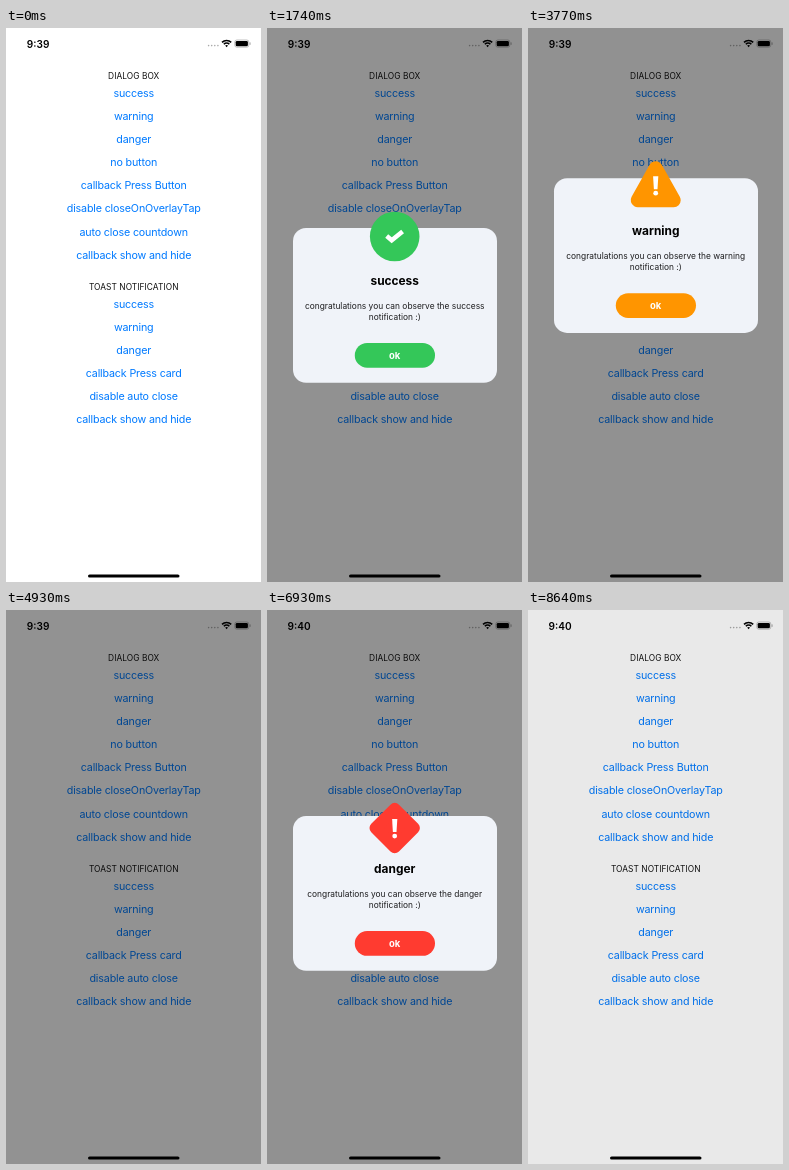
Write an HTML page with a canvas that moves like this. It is 255 px wide and 554 px high and loops after 8690 ms.

```html
<!DOCTYPE html>
<html lang="en">
<head>
<meta charset="utf-8">
<title>Dialog demo</title>
<style>
  html, body { margin: 0; width: 100%; height: 100%; overflow: hidden; background: #fff; }
  canvas { display: block; width: 255px; height: 554px; }
</style>
</head>
<body>
<canvas id="stage"></canvas>
<script>
const W = 255, H = 554, MID = 127.7, LOOP = 8690;
const FADE = 250;          // overlay fade and card exit, ms
const REST = 200, OUT = 571; // card top when settled and when off stage
const DIM = 0.43;
const FONT = 'Inter, Roboto, sans-serif';

const canvas = document.getElementById('stage');
const ctx = canvas.getContext('2d');
const scale = Math.max(1, window.devicePixelRatio || 1);
canvas.width = W * scale;
canvas.height = H * scale;

const sections = [
  { title: 'DIALOG BOX', y: 50.6, items: ['success', 'warning', 'danger', 'no button',
    'callback Press Button', 'disable closeOnOverlayTap', 'auto close countdown', 'callback show and hide'] },
  { title: 'TOAST NOTIFICATION', y: 261.6, items: ['success', 'warning', 'danger',
    'callback Press card', 'disable auto close', 'callback show and hide'] }
];

const dialogs = [
  { name: 'success', color: '#34c759', press: 100, open: 280, close: 2143, badge: checkBadge },
  { name: 'warning', color: '#ff9500', press: 3160, open: 3330, close: 4668, badge: triangleBadge },
  { name: 'danger', color: '#ff3b30', press: 6100, open: 6235, close: 8213, badge: diamondBadge }
];

const clamp = v => Math.min(1, Math.max(0, v));

// cubic-bezier(.42, 0, 1, 1), solved by bisection
function easeIn(x) {
  let lo = 0, hi = 1;
  for (let i = 0; i < 20; i++) {
    const u = (lo + hi) / 2, v = 1 - u;
    if (1.26 * v * v * u + 3 * v * u * u + u * u * u < x) lo = u; else hi = u;
  }
  return 3 * (1 - lo) * lo * lo + lo * lo * lo;
}

function easeInOut(x) {
  x = clamp(x);
  return x < 0.5 ? easeIn(2 * x) / 2 : 1 - easeIn(2 - 2 * x) / 2;
}

// Remaining distance (1 to 0) of an underdamped spring
function spring(ms) {
  const s = ms / 1000, decay = 9.76, freq = 15.71;
  return Math.exp(-decay * s) * (Math.cos(freq * s) + decay / freq * Math.sin(freq * s));
}

function text(str, x, y, size, color, weight = 400, spacing = 0) {
  ctx.font = `${weight} ${size}px ${FONT}`;
  ctx.letterSpacing = spacing + 'px';
  ctx.textAlign = 'center';
  ctx.fillStyle = color;
  ctx.fillText(str, x, y);
}

function pill(x, y, w, h, r, color) {
  ctx.fillStyle = color;
  ctx.beginPath();
  ctx.roundRect(x, y, w, h, r);
  ctx.fill();
}

function disc(x, y, r, color) {
  ctx.fillStyle = color;
  ctx.beginPath();
  ctx.arc(x, y, r, 0, 2 * Math.PI);
  ctx.fill();
}

function trace(points) {
  ctx.beginPath();
  points.forEach(([x, y]) => ctx.lineTo(x, y));
}

function roundedPolygon(points, radius, color) {
  trace(points);
  ctx.closePath();
  ctx.lineJoin = 'round';
  ctx.lineWidth = 2 * radius;
  ctx.fillStyle = ctx.strokeStyle = color;
  ctx.fill();
  ctx.stroke();
}

function exclamation(y) {
  ctx.fillStyle = '#fff';
  trace([[MID - 2.6, y], [MID + 2.6, y], [MID + 1.8, y + 13], [MID - 1.8, y + 13]]);
  ctx.fill();
  disc(MID, y + 17, 2.4, '#fff');
}

function checkBadge(top, color) {
  disc(MID, top + 8.5, 24.8, color);
  trace([[119.7, top + 8], [124.7, top + 12.3], [135.6, top + 3.6]]);
  ctx.strokeStyle = '#fff';
  ctx.lineWidth = 4.5;
  ctx.lineCap = 'butt';
  ctx.lineJoin = 'miter';
  ctx.stroke();
}

function triangleBadge(top, color) {
  roundedPolygon([[MID, top - 10], [MID - 18, top + 22], [MID + 18, top + 22]], 7, color);
  exclamation(top - 2);
}

function diamondBadge(top, color) {
  const y = top + 12, r = 19.2;
  roundedPolygon([[MID, y - r], [MID + r, y], [MID, y + r], [MID - r, y]], 6, color);
  exclamation(y - 9);
}

function statusBar(t) {
  text(t < 6260 ? '9:39' : '9:40', 32.1, 19.7, 10.1, '#000', 600);
  for (let i = 0; i < 4; i++) disc(202.6 + i * 3.1, 17.6, 0.8, '#aaa');

  ctx.strokeStyle = '#000';
  ctx.lineWidth = 1.6;
  ctx.lineCap = 'butt';
  for (const r of [3.9, 6.5]) {
    ctx.beginPath();
    ctx.arc(220.6, 19, r, -Math.PI * 0.75, -Math.PI * 0.25);
    ctx.stroke();
  }
  ctx.fillStyle = '#000';
  ctx.beginPath();
  ctx.moveTo(220.6, 19.2);
  ctx.arc(220.6, 19, 2, -Math.PI * 0.75, -Math.PI * 0.25);
  ctx.fill();

  ctx.strokeStyle = '#999';
  ctx.lineWidth = 0.6;
  ctx.beginPath();
  ctx.roundRect(228.8, 12, 14, 7.2, 2);
  ctx.stroke();
  pill(229.7, 12.9, 12.2, 5.4, 1.3, '#000');
  pill(243.6, 14.3, 0.9, 2.6, 0.4, '#999');
}

function pressAlpha(t, d) {
  if (!d || t < d.press) return 1;
  return 0.2 + 0.8 * easeInOut((t - d.open) / FADE);
}

function page(t) {
  ctx.fillStyle = '#fff';
  ctx.fillRect(0, 0, W, H);
  statusBar(t);
  sections.forEach((section, s) => {
    text(section.title, MID, section.y, 8.38, '#111', 400, 0.04);
    section.items.forEach((item, i) => {
      ctx.globalAlpha = s === 0 ? pressAlpha(t, dialogs[i]) : 1;
      text(item, MID, section.y + 17.95 + i * 23.17, 10.73, '#007aff', 400, -0.17);
      ctx.globalAlpha = 1;
    });
  });
  pill(82, 546.4, 91.5, 3.2, 1.6, '#000');
}

function card(d, top) {
  pill(26, top, 204, 154.7, 13, '#f0f3f9');
  d.badge(top, d.color);
  text(d.name, MID, top + 56.6, 11.9, '#000', 700);
  text(`congratulations you can observe the ${d.name}`, MID, top + 81.3, 8.4, '#1c1c1e');
  text('notification :)', MID, top + 91.7, 8.4, '#1c1c1e');
  pill(87.8, top + 115, 80.2, 24.7, 12.3, d.color);
  text('ok', MID, top + 130.7, 9.5, '#fff', 700);
}

function dialog(t, d) {
  const fadeOut = d.close + FADE;
  if (t < d.open || t > fadeOut + FADE) return;
  const shade = easeInOut((t - d.open) / FADE) - easeInOut((t - fadeOut) / FADE);
  ctx.fillStyle = `rgba(0, 0, 0, ${DIM * shade})`;
  ctx.fillRect(0, 0, W, H);

  const start = d.open + FADE + 8;
  if (t < start || t > fadeOut) return;
  const away = t < d.close ? spring(t - start) : easeInOut((t - d.close) / FADE);
  card(d, REST + (OUT - REST) * away);
}

function frame() {
  const t = performance.now() % LOOP;
  ctx.setTransform(scale, 0, 0, scale, 0, 0);
  page(t);
  dialogs.forEach(d => dialog(t, d));
  requestAnimationFrame(frame);
}
frame();
</script>
</body>
</html>
```
